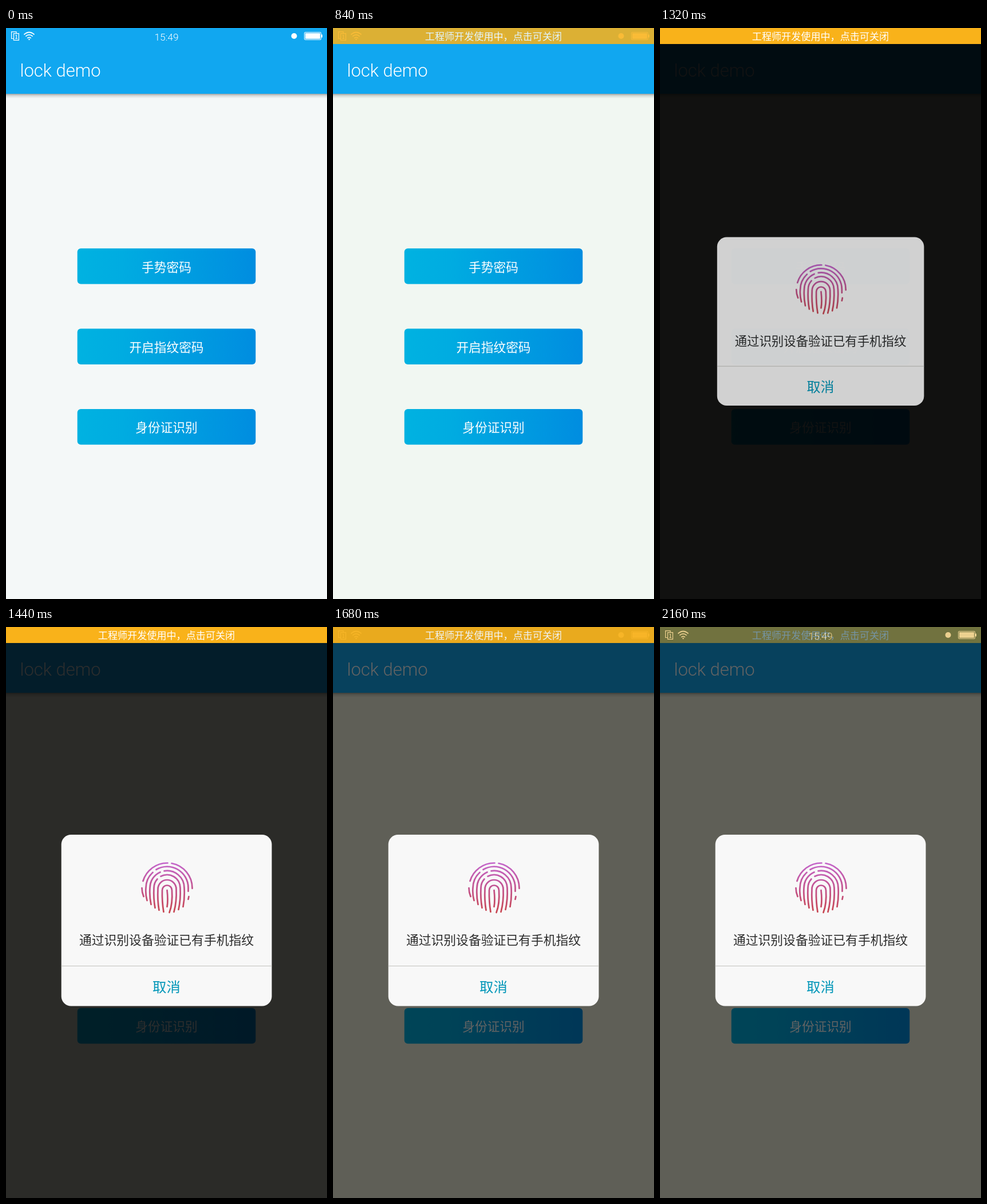
An HTML page for the animation above (2280 ms loop, 561 by 998 pixels).

```html
<!DOCTYPE html>
<html lang="zh-CN">
<head>
<meta charset="utf-8">
<title>lock demo</title>
<style>
  html, body { margin: 0; width: 100%; height: 100%; overflow: hidden; }
  svg { display: block; width: 561px; height: 998px; }
  text { font-family: Roboto, 'Noto Sans CJK SC', 'Noto Sans CJK', sans-serif; font-weight: 300; }
  .cjk { font-family: 'Noto Sans CJK SC', 'Noto Sans CJK', sans-serif; text-anchor: middle; }
</style>
</head>
<body>
<svg viewBox="0 0 561 998">
  <defs>
    <linearGradient id="buttonFill">
      <stop offset="0" stop-color="#00b2e1"/>
      <stop offset=".25" stop-color="#00ace1"/>
      <stop offset="1" stop-color="#008de0"/>
    </linearGradient>
    <linearGradient id="shadow" x2="0" y2="1">
      <stop offset="0" stop-opacity=".34"/>
      <stop offset=".4" stop-opacity=".13"/>
      <stop offset="1" stop-opacity="0"/>
    </linearGradient>
    <linearGradient id="ink" gradientUnits="userSpaceOnUse" x1="0" y1="-45" x2="0" y2="45">
      <stop offset="0" stop-color="#c466cc"/>
      <stop offset=".5" stop-color="#c2528e"/>
      <stop offset="1" stop-color="#c8444c"/>
    </linearGradient>
  </defs>

  <rect id="page" width="561" height="998"/>
  <rect y="115" width="561" height="8" fill="url(#shadow)"/>
  <rect width="561" height="115" fill="#11a7f0"/>
  <text x="24.5" y="85" font-size="31" fill="#fff">lock demo</text>
  <g id="buttons"></g>
  <rect id="scrim" width="561" height="998"/>

  <g id="status" fill="none" stroke="#fff" stroke-width="1.2">
    <path d="M13 18.5H9.6V6.6H18V9M13.5 9.6H22.4V21.4H13.5ZM16.5 12.5H18.2V18.5M16.3 18.5H20"/>
    <g stroke-width="1.7">
      <path d="M31.5 11.5Q40.5 3.5 49.5 11.5M34.3 14.7Q40.5 9.2 46.7 14.7M37.2 17.8Q40.5 15 43.8 17.8"/>
      <circle cx="40.5" cy="20" r="1.2" fill="#fff" stroke="none"/>
    </g>
    <circle cx="503.5" cy="14" r="5" fill="#fff" stroke="none"/>
    <rect x="521.5" y="7.5" width="29" height="13" rx="1.5" stroke-width="1"/>
    <path d="M523 9H549V19H523ZM551 11.5H553V16.5H551Z" fill="#fff" stroke="none"/>
    <text x="280.5" y="21.5" font-size="17.4" text-anchor="middle" fill="#fff" stroke="none">15:49</text>
  </g>

  <g id="banner">
    <rect width="561" height="28" fill="#f9b21a"/>
    <text class="cjk" x="280.5" y="21.2" font-size="17.1" fill="#fff">工程师开发使用中，点击可关闭</text>
  </g>

  <g id="dialog">
    <rect x="96.7" y="363" width="367.8" height="299.5" rx="17" fill="#f8f8f8"/>
    <g transform="translate(281.5 456)" fill="none" stroke="url(#ink)" stroke-width="2.7" stroke-linecap="round">
      <path d="M-44 0Q-44 8-41 15M-42-12A44 44 0 0 1 1-43.5M8-43A44 44 0 0 1 44 1"/>
      <path d="M-35 22Q-38 11-37 0A37 37 0 0 1-25-27M-19-32A37 37 0 0 1 37 0V6M38 15L37 20"/>
      <path d="M-28 29Q-31 15-30 0A30 30 0 0 1-12-27.5M-5-29.6A30 30 0 0 1 30 0Q31 18 28 33"/>
      <path d="M-21 35Q-24 18-23 0A23 23 0 0 1-17-15.5M-11-20.2A23 23 0 0 1 23 0Q24 20 20 38"/>
      <path d="M-14 39Q-17 22-16 2A16 16 0 0 1 16 2Q17 24 12 42"/>
      <path d="M-6 42Q-9 24-8.5 4A8.5 8.5 0 0 1 8.5 4Q10 28 4 43M0 4Q2 22 0 33"/>
    </g>
    <text class="cjk" x="280.5" y="555.3" font-size="21.8" fill="#2c2c2c">通过识别设备验证已有手机指纹</text>
    <rect x="96.7" y="592" width="367.8" height="1" fill="#c2c2bd"/>
    <text class="cjk" x="280.5" y="637.8" font-size="24.4" fill="#0096b8">取消</text>
  </g>
</svg>
<script>
  const LOOP = 2280, STEP = 120, DIALOG_AT = 1320, FADE = 960;
  const el = id => document.getElementById(id);
  const clamp = v => Math.min(1, Math.max(0, v));
  const mix = (a, b, k) => a.map((v, i) => Math.round(v + (b[i] - v) * k));

  el('buttons').innerHTML = ['手势密码', '开启指纹密码', '身份证识别'].map((label, i) => {
    const y = 385.2 + i * 140.4;
    return `<rect x="124.7" y="${y}" width="311.6" height="62.3" rx="6" fill="url(#buttonFill)"/>
      <text class="cjk" x="280.5" y="${y + 40.3}" font-size="21.7" fill="#fff">${label}</text>`;
  }).join('');

  function draw(time) {
    const t = Math.floor(time % LOOP / STEP) * STEP;
    const open = t >= DIALOG_AT;

    // The banner fades in, holds, then starts to fade out.
    const banner = Math.min(clamp(t / FADE), 1 - clamp((t - 1620) / FADE));
    el('banner').setAttribute('opacity', banner);
    el('status').setAttribute('opacity', open ? 0.88 : 1);

    const page = open ? [246, 246, 226] : mix([244, 248, 248], [240, 247, 240], clamp(t / 1200));
    el('page').setAttribute('fill', `rgb(${page})`);

    const light = open ? 0.07 + 0.32 * clamp((t - DIALOG_AT) / 360) : 1;
    el('scrim').setAttribute('opacity', 1 - light);

    const grown = clamp((t - DIALOG_AT) / STEP);
    const scale = 0.983 + 0.017 * grown;
    el('dialog').setAttribute('opacity', open ? 0.83 + 0.17 * grown : 0);
    el('dialog').setAttribute('transform',
      `translate(280.6 512.7) scale(${scale}) translate(-280.6 -512.7)`);
  }

  const start = performance.now();
  function tick() {
    draw(performance.now() - start);
    requestAnimationFrame(tick);
  }
  tick();
</script>
</body>
</html>
```
